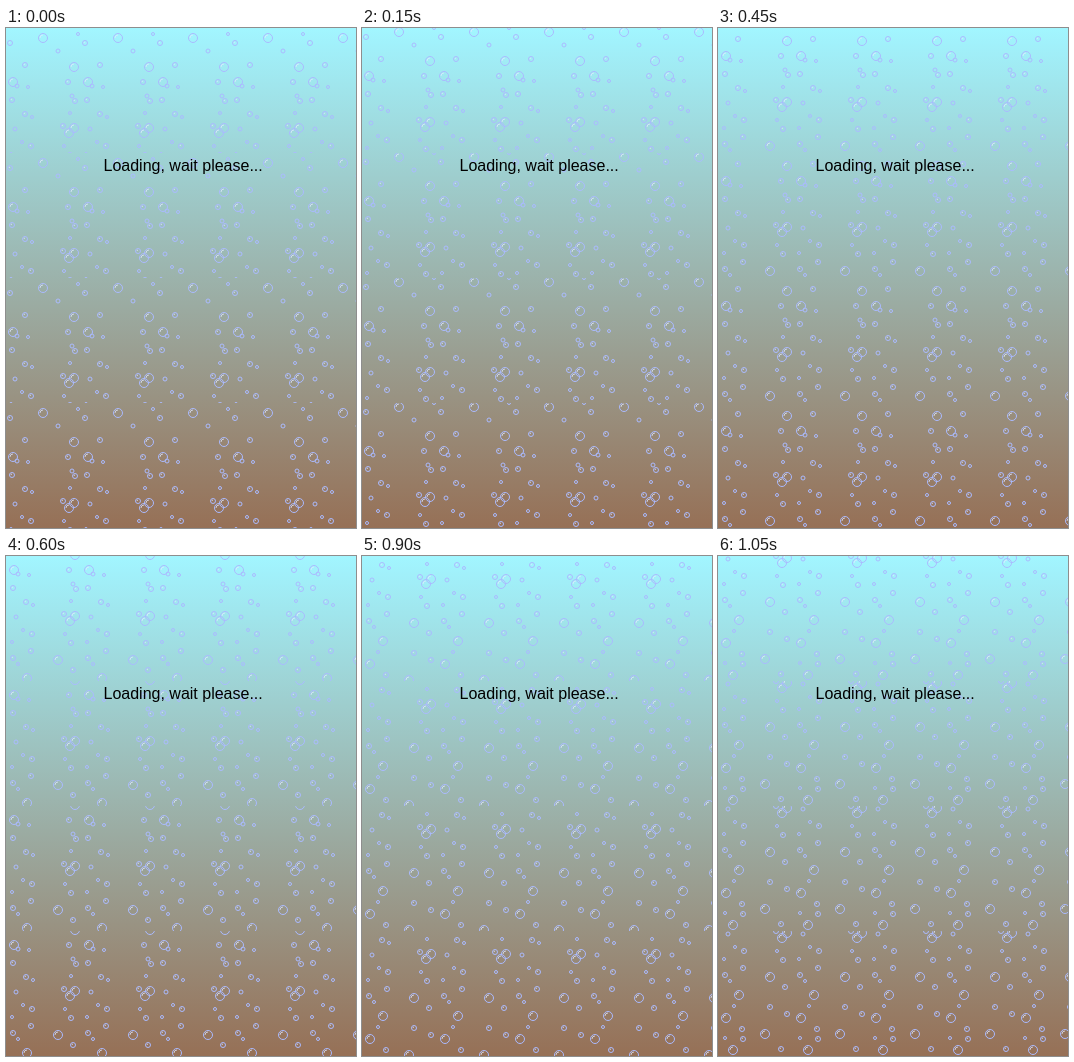
Write an HTML page with a canvas that moves like this. It is 350 px wide and 500 px high and loops after 1.2 s.

```html
<!DOCTYPE html>
<html lang="en">
<head>
<meta charset="utf-8">
<title>Loading</title>
<style>
  html, body { margin: 0; width: 100%; height: 100%; overflow: hidden; }
  canvas { display: block; }
</style>
</head>
<body>
<canvas id="stage" width="350" height="500"></canvas>
<script>
const ctx = document.getElementById('stage').getContext('2d');
const tile = document.createElement('canvas');
tile.width = 75;
tile.height = 125;
const tctx = tile.getContext('2d');

// How far the column of bubbles has risen in each 150 ms step.
const STEP = 150;
const rises = [0, 6, 12, 26, 40, 62, 77, 98];

// Bubble centres [x, y] in one tall column, grouped by outer radius.
const bubbles = {
  5: [[37, 10], [68, 39], [7, 54], [68, 100], [63, 105], [51, 144],
      [20, 162], [7, 185], [46, 201], [14, 217]],
  3: [[4, 15], [19, 37], [62, 54], [6, 72], [69, 73], [19, 86], [57, 98],
      [25, 118], [64, 127], [24, 135], [6, 142], [66, 154], [51, 174],
      [68, 181], [23, 196], [24, 206], [62, 216]],
  2.5: [[52, 23], [11, 58], [66, 68], [9, 101]],
  2: [[72, 6], [22, 59], [26, 89], [64, 85], [16, 114], [58, 118],
      [5, 126], [11, 148], [15, 173], [6, 205]]
};

const sky = ctx.createLinearGradient(0, 0, 0, 500);
sky.addColorStop(0, '#a2f6ff');
sky.addColorStop(0.03, '#a1f1fb');
sky.addColorStop(1, '#967056');

function arc(x, y, r, from, to, color) {
  tctx.strokeStyle = color;
  tctx.beginPath();
  tctx.arc(x, y, r, from, to);
  tctx.stroke();
}

function drawBubble(x, y, radius) {
  arc(x, y, radius - 0.5, 0, 2 * Math.PI, '#aabaff');
  if (radius >= 3) {
    arc(x, y, radius - 2, Math.PI, 1.5 * Math.PI, 'rgba(225,232,255,0.75)');
  }
}

function draw(step) {
  const drift = step < 3 ? 0 : 1;
  tctx.clearRect(0, 0, tile.width, tile.height);
  for (const [radius, centres] of Object.entries(bubbles)) {
    for (const [x, y] of centres) drawBubble(x + drift, y - rises[step], +radius);
  }

  ctx.fillStyle = sky;
  ctx.fillRect(0, 0, 350, 500);
  ctx.fillStyle = ctx.createPattern(tile, 'repeat');
  ctx.fillRect(0, 0, 350, 500);

  ctx.fillStyle = '#000';
  ctx.font = '16px "Liberation Sans", Arial, sans-serif';
  ctx.fillText('Loading, wait please...', 97.5, 143);
}

const start = performance.now();
function tick() {
  const elapsed = performance.now() - start;
  draw(Math.floor(elapsed / STEP) % rises.length);
  requestAnimationFrame(tick);
}
tick();
</script>
</body>
</html>
```
